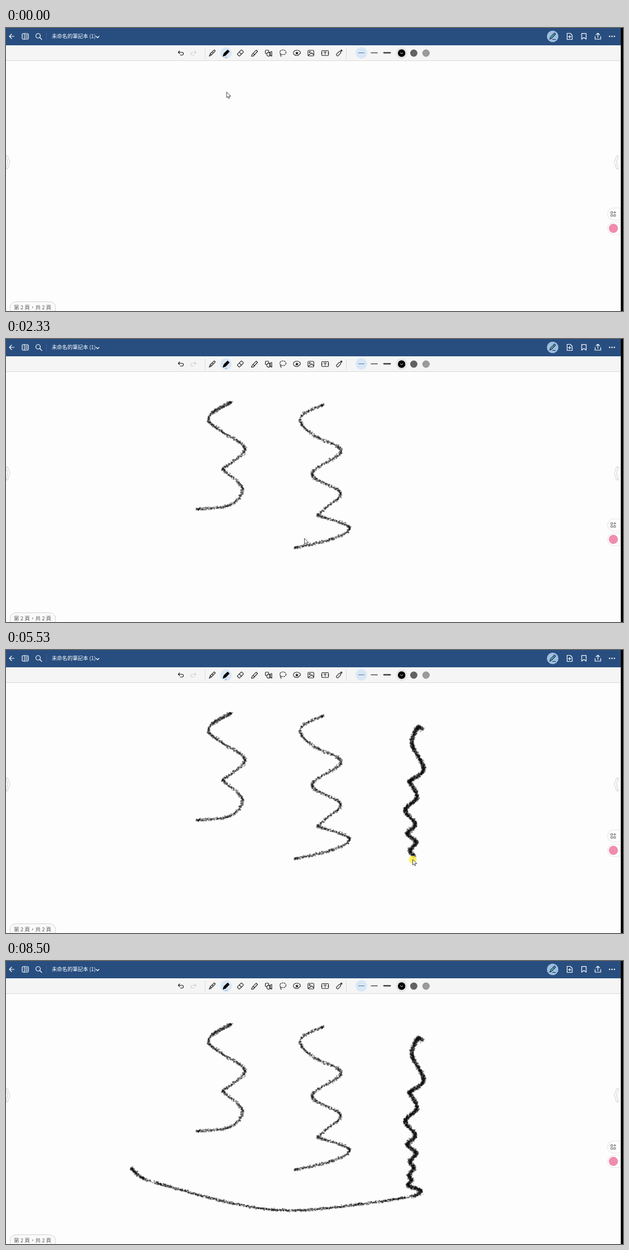
An HTML page with a canvas that plays this animation: 1105 px wide and 507 px high, repeating every 8860 ms.

```html
<!DOCTYPE html>
<html lang="zh-Hant">
<head>
<meta charset="utf-8">
<title>Notebook</title>
<style>
html, body { margin: 0; width: 100%; height: 100%; overflow: hidden; background: #fdfdfd; }
svg, canvas { position: absolute; left: 0; top: 0; width: 1105px; height: 507px; }
svg { fill: none; stroke-linecap: round; stroke-linejoin: round; }
text { font-family: "Noto Sans CJK TC", "Noto Sans CJK", "Noto Sans", sans-serif; stroke: none; }
</style>
</head>
<body>
<svg viewBox="0 0 1105 507">
  <rect width="1105" height="507" fill="#fdfdfd"/>
  <rect width="1105" height="31" fill="#284e80"/>
  <rect y="31" width="1105" height="27.5" fill="#f5f5f5"/>
  <path d="M0 58.5H1101" stroke="#dadada"/>

  <g stroke="#fff" stroke-width="1.2">
    <path d="M14.5 15H6m4-4l-4 4l4 4"/>
    <rect x="29" y="10" width="11" height="10" rx="1.8"/>
    <path d="M33 10v10m2-7.4h3m-3 2.4h3m-3 2.4h3" stroke-width="1"/>
    <circle cx="57.5" cy="14" r="4"/><path d="M60.5 17l3.5 3.5"/>
    <path d="M72.5 8v14" stroke="#3c608f" stroke-width="1"/>
    <path d="M161.5 15l2.5 2.5l2.5-2.5"/>
    <path d="M1005 9.5h5.5l3.5 3.5v7.5h-9zM1009.5 13.2V18m-2.4-2.4h4.8"/>
    <path d="M1031 9.8h8V20l-4-3l-4 3z"/>
    <path d="M1060 17V9.5m-3 2.5l3-2.7l3 2.7m-8 3v5h10v-5"/>
    <path d="M1081 15h10" stroke-width="2.4" stroke-dasharray="0 4.3"/>
  </g>
  <circle cx="979" cy="15" r="10.3" fill="#9dbee0"/>
  <path d="M974 20l1.3-4.2l7-7l2 2l-6.9 7.4zM980 11.2l2.2 2.1M979 20.5h5" stroke="#14283f" stroke-width="1.2"/>
  <path d="M976.5 16.5l4-4" stroke="#3fa59b" stroke-width="1.8"/>
  <text x="82" y="18.4" font-size="9.3" fill="#fff" font-weight="500">未命名的筆記本 (1)</text>

  <circle cx="394" cy="45" r="10.3" fill="#d8e7f6"/>
  <g stroke="#222" stroke-width="1.1">
    <path id="undo" d="M311 41l-2.5 2.5l2.5 2.5m-2.2-2.5h6.4a2.5 2.5 0 0 1 0 5h-3"/>
    <use href="#undo" transform="matrix(-1 0 0 1 649 0)" opacity=".17"/>
    <path d="M356.5 36v19M609.5 36v19" stroke="#dcdcdc" stroke-width="1"/>
    <path d="M364 50.5l1.8-4.5l7.2-6.9l1.9 1.9l-7 7.4zM365.8 46l2.1 2.4l3.1-3.2l-2-2.2z"/>
    <path d="M388.8 50.4l1.6-4.7l6.6-6.2l2.7 2.7l-6.2 6.5z" fill="#000" stroke="#000"/>
    <path d="M392.6 52.2l1.4 1.1l1.4-1.1" stroke="#65809b" stroke-width=".8"/>
    <rect x="-2.7" y="-5.5" width="5.4" height="11" rx="1" transform="translate(419.8 44.8) rotate(45)"/>
    <path d="M417.8 43.2l4 3.8"/>
    <path d="M439.5 50.5h3l8-8.5l-2.3-2.4l-7 7.1zM442.4 45.5l3.2 2.6"/>
    <rect x="464.5" y="39.8" width="6" height="6" rx="1"/>
    <circle cx="470.5" cy="47" r="3.4" fill="#f5f5f5"/>
    <path d="M472 44l4-2v8.5l-4.3-2.5z"/>
    <ellipse cx="496" cy="43.5" rx="5.5" ry="4.3" stroke-dasharray="2.4 1.7"/>
    <path d="M492 46.5q-1.5 1.5 0 2.5q1.5.5.4 2"/>
    <path d="M523.2 48.9a6.4 4.7 0 1 1 4.1-3.9z"/>
    <path d="M521 41.8l1 2.1l2 .2l-1.5 1.4l.4 2.1l-1.9-1.1l-1.9 1.1l.4-2.1l-1.5-1.4l2-.2z" fill="#111" stroke="none"/>
    <rect x="540.8" y="40" width="10.5" height="10" rx="1.6"/>
    <circle cx="544" cy="43" r="1"/><path d="M541.5 49l6-4.5l3.5 3.5"/>
    <rect x="565.5" y="40.5" width="12" height="8.8" rx="1.3"/>
    <path d="M569 43h5m-2.5 0v4.2"/>
    <path d="M565.5 45h0m12 0h0" stroke-width="2.2"/>
    <rect x="-2" y="-5" width="4" height="9" rx="1.4" transform="translate(595.2 46.3) rotate(43)"/>
    <path d="M600.5 38.7v3.8m-1.9-1.9h3.8m-3.2-1.3l2.6 2.6m0-2.6l-2.6 2.6" stroke-width=".8"/>
  </g>

  <circle cx="636.5" cy="44.5" r="10.3" fill="#d8e7f6"/>
  <g stroke="#4c4c4c">
    <path d="M631.5 44.5h10" stroke="#58728e"/>
    <path d="M654 44.5h11" stroke-width="1.6"/>
    <path d="M677 44.3h11" stroke-width="2.8"/>
  </g>
  <circle cx="708.5" cy="45" r="10.3" fill="#e6e6e6"/>
  <circle cx="708.5" cy="45" r="6.7" fill="#000"/>
  <path d="M706.4 44.3l2.1 2l2.1-2" stroke="#fff"/>
  <circle cx="730.3" cy="45" r="6.5" fill="#626262"/>
  <circle cx="752.2" cy="45" r="6.2" fill="#9b9b9b" stroke="#858585" stroke-width=".6"/>

  <path id="handle" d="M0 229h3l4 11.5l-4 12h-3l3.3-12z" fill="#fff" stroke="#cdcdcd"/>
  <use href="#handle" transform="matrix(-1 0 0 1 1096.5 0)"/>
  <path id="tab" d="M1101 322.5h-13a10.7 10.7 0 0 0 0 21.4h13z" fill="#fff" stroke="#ededed" stroke-width="1.5"/>
  <use href="#tab" y="26"/>
  <g stroke="#6d6d6d">
    <path d="M1083.5 329h3v3h-3zm0 5.3h3v3h-3zm5.3 0h3v3h-3zM1090.3 328.4v4m-2-2h4"/>
  </g>
  <circle cx="1087.8" cy="359" r="8.2" fill="#f08cae"/>
  <rect x="7" y="490.5" width="82" height="22" rx="10.5" fill="#fafafa" stroke="#d2d2d2"/>
  <text x="14" y="504.3" font-size="9.6" fill="#5c5c5c">第 2 頁，共 2 頁</text>
  <rect x="1101" width="4" height="507" fill="#000"/>
</svg>
<canvas id="ink" width="1105" height="507"></canvas>
<svg viewBox="0 0 1105 507">
  <g id="cursor">
    <circle id="press" r="7" fill="#fff04a" fill-opacity=".88"/>
    <path d="M0 0v9.8l2.3-2l1.5 3.4l1.6-.7l-1.4-3.3h3z" fill="#fff" stroke="#333" stroke-width=".9"/>
  </g>
</svg>
<script>
const LOOP = 8860, LEAD = 60;
const cursor = document.getElementById('cursor');
const press = document.getElementById('press');
const ctx = document.getElementById('ink').getContext('2d');

// Points are [x, y] or [x, y, ms]; a repeated point makes a sharp corner.
const left = trace([
  [403,113,130],[370,132,280],[364,149],[392,169],[428,198],[387,233],[387,233],
  [423,267,730],[402,297],[341,305,890]
]);
const middle = trace([
  [569,118,1300],[535,133],[528,150],[552,173],[600,201],[548,242],[599,275],
  [572,303,1900],[558,316],[558,316],[615,337],[585,358],[517,374,2220]
]);
const right = trace([
  [745,143,2880],[738,138],[727,168],[748,213,3660],[722,235],[722,235],[736,264],
  [715,287,4600],[733,312],[719,329],[735,344],[723,360],[731,371,5530],[721,384],[727,392],
  [720,402],[742,411],[736,419,6370],[715,424],[640,435],[515,447],[410,435],
  [268,397,6730],[241,386,6790],[224,371,6900]
]);
const strokes = [left, middle, right];

// Where the pointer goes while nothing is drawn.
const idle = [
  [395,115,0],[403,113,70],[341,305,830],[355,303,930],[569,118,1240],[517,374,2160],[534,358,2330],
  [740,150,2760],[745,143,2820],[224,371,6840],[226,368,6990],[226,368,7520],[1006,496,8380],
  [1044,502,8440],[1085,512,8500],[1085,540,LOOP]
];

let seed = 7;
function random() {
  seed = (seed * 16807) % 2147483647;
  return seed / 2147483647;
}

function clamp(v, lo, hi) { return Math.min(hi, Math.max(lo, v)); }
function lerp(a, b, k) { return a + (b - a) * k; }

function spline(a, b, c, d, k) {
  return b + k / 2 * (c - a + k * (2 * a - 5 * b + 4 * c - d + k * (3 * (b - c) + d - a)));
}

// Samples a smooth curve about every half pixel, with a time and speed for each sample.
function trace(points) {
  const samples = [{ x: points[0][0], y: points[0][1], t: points[0][2], speed: .3 }];
  let anchor = 0;
  for (let i = 1; i < points.length; i++) {
    const b = points[i - 1], c = points[i];
    const a = points[i - 2] || b, d = points[i + 1] || c;
    const n = Math.ceil(Math.hypot(c[0] - b[0], c[1] - b[1]) * 2);
    for (let k = 1; k <= n; k++) {
      samples.push({ x: spline(a[0], b[0], c[0], d[0], k / n), y: spline(a[1], b[1], c[1], d[1], k / n) });
    }
    if (c[2] === undefined) continue;
    const start = samples[anchor].t, count = samples.length - 1 - anchor;
    for (let j = 1; j <= count; j++) {
      const s = samples[anchor + j];
      s.t = lerp(start, c[2], j / count);
      s.speed = count / 2 / (c[2] - start);
    }
    anchor = samples.length - 1;
  }
  return samples;
}

// Slow movement leaves a wider and denser trail.
const grains = [];
for (const { x, y, t, speed } of strokes.flat()) {
  const count = Math.floor(clamp(1.3 / speed, 2.8, 9) / 2 + random());
  const spread = Math.min(2.8 + .2 / speed, 4.4);
  const scatter = () => (random() + random() - 1) * spread;
  for (let i = 0; i < count; i++) {
    grains.push({ x: x + scatter(), y: y + scatter(), t, size: 1.3 + random() * 1.3 });
  }
}

let drawn = 0;
function drawInk(t) {
  if (drawn && grains[drawn - 1].t > t) {
    ctx.clearRect(0, 0, 1105, 507);
    drawn = 0;
  }
  ctx.fillStyle = 'rgba(12,12,12,.37)';
  while (drawn < grains.length && grains[drawn].t <= t) {
    const { x, y, size } = grains[drawn++];
    ctx.fillRect(x - size / 2, y - size / 2, size, size);
  }
}

function drawCursor(t) {
  const ahead = t + LEAD;
  const stroke = strokes.find(s => s[0].t <= ahead && ahead <= s[s.length - 1].t);
  let x, y;
  if (stroke) {
    ({ x, y } = stroke.find(s => s.t >= ahead));
  } else {
    const i = idle.findIndex(p => p[2] > t);
    const a = idle[i - 1], b = idle[i], k = (t - a[2]) / (b[2] - a[2]);
    x = lerp(a[0], b[0], k);
    y = lerp(a[1], b[1], k);
  }
  cursor.setAttribute('transform', `translate(${x.toFixed(1)} ${y.toFixed(1)})`);
  press.setAttribute('visibility', stroke ? 'visible' : 'hidden');
}

function render(t) {
  drawInk(t);
  drawCursor(t);
}

const begin = performance.now();
function tick() {
  render((performance.now() - begin) % LOOP);
  requestAnimationFrame(tick);
}
tick();
</script>
</body>
</html>
```
